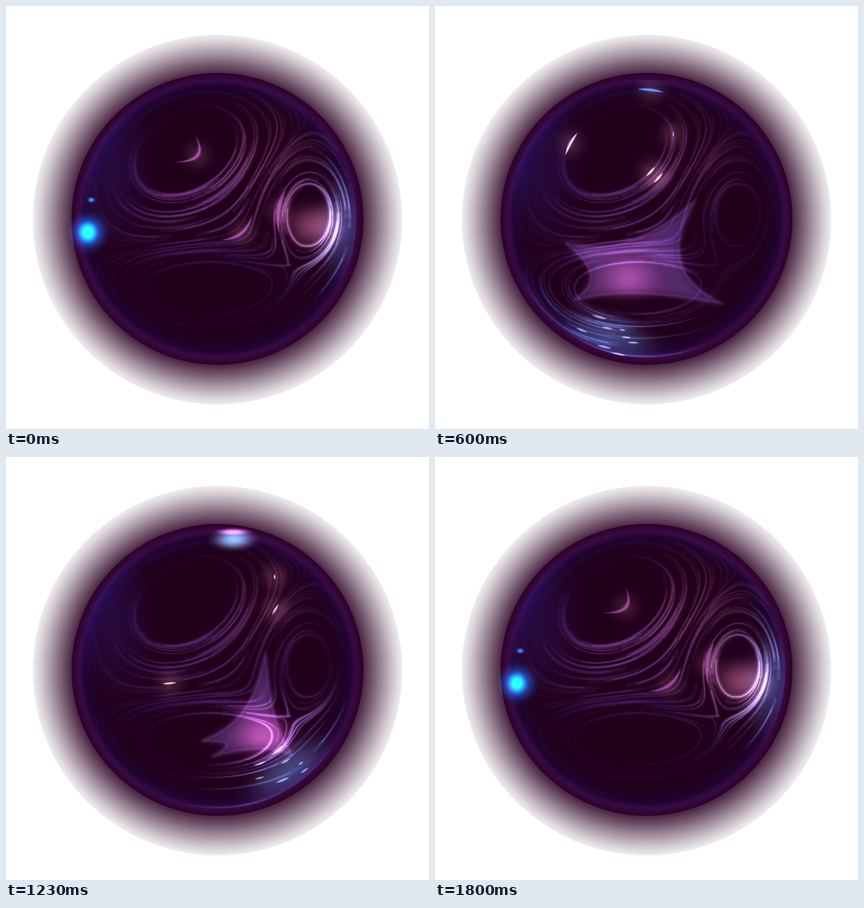
An HTML page with a canvas for the animation above (1830 ms loop, 600 by 600 pixels).

```html
<!DOCTYPE html>
<html lang="en">
<head>
<meta charset="utf-8">
<title>Glass orb</title>
<style>
  html, body { margin: 0; width: 100%; height: 100%; overflow: hidden; background: #fff; }
  canvas { display: block; width: 100vw; height: 100vh; }
</style>
</head>
<body>
<canvas id="stage" width="600" height="600"></canvas>
<script>
const LOOP = 1830, STEP = 30, TAU = Math.PI * 2;
const CX = 300, CY = 302, R = 197;
const ctx = document.getElementById('stage').getContext('2d');

const layer = () => {
  const c = document.createElement('canvas');
  c.width = c.height = 600;
  return c.getContext('2d');
};
const mix = (a, b, u) => a + (b - a) * u;
const clamp = u => Math.min(1, Math.max(0, u));
const smooth = u => (u = clamp(u)) * u * (3 - 2 * u);

let seed = 11;
const random = () => (seed = (seed * 16807) % 2147483647) / 2147483647;

// Signed distance in time around the loop
const since = (t, at) => ((t - at + LOOP * 1.5) % LOOP) - LOOP / 2;
const bell = (t, at, life) => Math.max(0, 1 - (since(t, at) / life) ** 2) ** 2;

function rgba(hex, alpha) {
  const n = parseInt(hex.slice(1), 16);
  return `rgba(${n >> 16},${n >> 8 & 255},${n & 255},${alpha})`;
}

// Three swirls inside the glass; the threads follow the level lines of their sum
const swirl = (x, y, cx, cy, rx, ry) => Math.exp(-(((x - cx) / rx) ** 2) - ((y - cy) / ry) ** 2);
function stream(x, y) {
  const edge = 1 - ((x - CX) ** 2 + (y - CY) ** 2) / (R * R);
  const lens = swirl(x + (y - 165) * .35, y, 245, 165, 120, 110);
  return edge * (lens - swirl(x, y, 455, 295, 65, 85) - swirl(x, y, 280, 408, 125, 45));
}

function follow(x, y, distance) {
  const steps = Math.max(1, Math.ceil(Math.abs(distance) / 3)), h = distance / steps;
  const points = [[x, y]];
  for (let i = 0; i < steps; i++) {
    const dx = stream(x + 1, y) - stream(x - 1, y), dy = stream(x, y + 1) - stream(x, y - 1);
    const size = Math.hypot(dx, dy) || 1;
    x -= dy / size * h;
    y += dx / size * h;
    points.push([x, y]);
  }
  return points;
}
const along = (x, y, distance) => follow(x, y, distance).pop();

function makeThreads(count) {
  const g = layer();
  g.lineJoin = 'round';
  while (count > 0) {
    const a = random() * TAU, r = R * Math.sqrt(random());
    const x = CX + r * Math.cos(a), y = CY + r * Math.sin(a);
    if (Math.abs(stream(x, y)) > .36) continue;
    const reach = 40 + random() * 75;
    const path = [...follow(x, y, -reach).reverse(), ...follow(x, y, reach)];
    const strength = .15 + random() * .55, width = .5 + random() * 1.4;
    for (const [spread, part] of [[4, .22], [2.2, .3], [1, 1]]) {
      // Shorter strokes on top make the ends fade
      const cut = Math.round(path.length * .06 * (4 - spread));
      g.beginPath();
      path.slice(cut, path.length - cut).forEach(p => g.lineTo(...p));
      g.strokeStyle = `rgba(255,255,255,${strength * part})`;
      g.lineWidth = width * spread;
      g.stroke();
    }
    count--;
  }
  return g.canvas;
}
const threads = makeThreads(125);
const lights = layer();

// Soft elliptical light
function blob(g, x, y, rx, ry, color, alpha = 1, angle = 0) {
  if (alpha <= 0) return;
  g.save();
  g.translate(x, y);
  g.rotate(angle);
  g.scale(rx, ry);
  const fill = g.createRadialGradient(0, 0, 0, 0, 0, 1);
  for (let u = 0; u <= 1; u += .2) fill.addColorStop(u, rgba(color, alpha * (1 - smooth(u))));
  g.fillStyle = fill;
  g.fillRect(-1, -1, 2, 2);
  g.restore();
}

// Tapered reflection that lies along the threads
function glint(x, y, length, color, alpha) {
  const [x0, y0] = along(x, y, -length / 2), [x1, y1] = along(x, y, length / 2);
  const mx = 2 * x - (x0 + x1) / 2, my = 2 * y - (y0 + y1) / 2;
  const span = Math.hypot(x1 - x0, y1 - y0) || 1;
  const nx = (y0 - y1) / span, ny = (x1 - x0) / span;
  const width = Math.min(4, 1.2 + length / 22);
  for (const [spread, part] of [[2.2, .18], [1.4, .3], [.7, .55]]) {
    const w = width * spread;
    ctx.fillStyle = rgba(color, alpha * part);
    ctx.beginPath();
    ctx.moveTo(x0, y0);
    ctx.quadraticCurveTo(mx + nx * w, my + ny * w, x1, y1);
    ctx.quadraticCurveTo(mx - nx * w, my - ny * w, x0, y0);
    ctx.fill();
  }
}

// Brief reflections: x, y, length
const FLASHES = [
  { at: 90, life: 420, color: '#84489a', spots: [[275, 207, 74], [338, 318, 62], [388, 285, 62]] },
  { at: 240, life: 210, color: '#9c6080', spots: [[190, 360, 44]] },
  { at: 600, life: 150, color: '#ffe8f0', spots: [[192, 195, 36], [306, 235, 18], [317, 244, 20]] },
  { at: 600, life: 150, color: '#20a0ff', spots: [[306, 119, 38], [338, 182, 8]] },
  { at: 960, life: 170, color: '#fff0ff',
    spots: [[240, 342, 110], [262, 418, 100], [279, 377, 9], [333, 402, 44], [396, 225, 36]] },
  { at: 960, life: 170, color: '#30a0ff', spots: [[327, 192, 26]] },
  { at: 1230, life: 140, color: '#ffe0d8', spots: [[381, 170, 8], [232, 321, 20], [382, 216, 18]] },
  { at: 1470, life: 150, color: '#ffe8f0', spots: [[236, 168, 17], [220, 163, 18]] },
  { at: 1470, life: 150, color: '#3858f0', spots: [[150, 257, 24], [223, 193, 6]] }
];

function drawFlashes(t) {
  for (const { at, life, color, spots } of FLASHES) {
    const power = bell(t, at, life);
    if (!power) continue;
    for (const [x, y, length] of spots) {
      const [px, py] = along(x, y, since(t, at) * .06);
      blob(ctx, px, py, 30, 30, '#503c38', power * .45);
      glint(px, py, length, color, power * .9);
    }
  }
}

// One pair of lights circles the lower right: a pink one inside, a blue one at the rim
function orbit(t) {
  const p = ((t - 420 + LOOP) % LOOP) / LOOP;
  const angle = (122 - 153 * p) * Math.PI / 180;
  const at = r => [CX + r * Math.cos(angle), CY + r * Math.sin(angle)];
  return { p, angle, power: smooth(Math.min(p, 1 - p) / .14), inner: at(80 + 78 * p), outer: at(174) };
}

function lamp(x, y, rx, ry, color, power, angle = 0) {
  blob(ctx, x, y, rx, ry, color, power * .6, angle);
  blob(lights, x, y, rx * 2.3, ry * 2.3, color, power, angle);
}

function drawLights(t) {
  const { p, angle, power, inner, outer } = orbit(t);
  const sweep = bell(t, 960, 230);
  lights.globalCompositeOperation = 'source-over';
  lights.clearRect(0, 0, 600, 600);
  lights.globalCompositeOperation = 'lighter';
  const mid = .62 + .2 * Math.cos(since(t, 60) / LOOP * TAU);
  blob(lights, 265, 275, 160, 110, '#704468', mid);
  blob(lights, 365, 210, 120, 110, '#6c4038', mid);
  blob(lights, CX, CY, 250, 250, '#141c50', .8);
  blob(ctx, 150, 230, 75, 140, '#0c1040', .5);

  const pink = `#${Math.round(mix(140, 196, p)).toString(16)}${p < .5 ? '5094' : '7488'}`;
  lamp(...inner, 56, 42, pink, power * .95);
  lamp(...outer, 42, 90, '#5088c0', power * mix(1, .6, p), angle);

  lamp(155, 382, 48, 36, '#c070b8', sweep);
  lamp(462, 290, 36, 62, '#50a4dc', sweep);
  lamp(420, 430, 60, 85, '#4880a8', sweep * .7, Math.PI / 4);

  lights.globalCompositeOperation = 'destination-in';
  lights.drawImage(threads, 0, 0);
  ctx.drawImage(lights.canvas, 0, 0);
}

// Soft veil stretched from the inner light to fixed points in the glass
function drawVeil(t) {
  const power = bell(t, 600, 250) + bell(t, 1230, 230);
  if (!power) return;
  const [x, y] = orbit(t).inner, u = clamp((t - 600) / 630);
  const tips = [[x - 90, mix(y - 50, y + 8, u)], [368, 277], [406, 422], [x - 75, y + 30]];
  ctx.save();
  ctx.filter = 'blur(5px)';
  ctx.beginPath();
  ctx.moveTo(...tips[0]);
  tips.forEach(([ax, ay], i) => {
    const [bx, by] = tips[(i + 1) % tips.length];
    ctx.quadraticCurveTo(mix((ax + bx) / 2, x, .7), mix((ay + by) / 2, y, .7), bx, by);
  });
  const fill = ctx.createRadialGradient(x, y, 0, x, y, 120);
  fill.addColorStop(0, rgba('#704478', power * .6));
  fill.addColorStop(1, rgba('#5050a0', power * .5));
  ctx.fillStyle = fill;
  ctx.fill();
  ctx.filter = 'blur(1.5px)';
  ctx.strokeStyle = rgba('#805898', power * .4);
  ctx.lineWidth = 2;
  ctx.stroke();
  ctx.restore();
}

// Small sparks scattered around the rim light
const sparks = Array.from({ length: 9 }, () => [(random() - .5) * 90, (random() - .5) * 55, 8 + random() * 18]);
function drawSparks(t) {
  const { p, power, outer: [x, y] } = orbit(t);
  for (const [dx, dy, length] of sparks) {
    glint(x + dx, y + dy, length, '#d8e8ff', power * .75 * smooth((.62 - p) / .25));
  }
}

function drawBase() {
  ctx.fillStyle = '#fff';
  ctx.fillRect(0, 0, 600, 600);
  const halo = ctx.createRadialGradient(CX, 303, R, CX, 303, 262);
  for (let u = 0; u <= 1.001; u += .1) {
    halo.addColorStop(Math.min(1, u), rgba('#2c0224', mix(1, .08, 1 - (1 - u) ** 1.25 * (1 + .25 * u))));
  }
  halo.addColorStop(1, rgba('#2c0224', 0));
  ctx.fillStyle = halo;
  ctx.fillRect(0, 0, 600, 600);

  const glass = ctx.createRadialGradient(CX, CY, 0, CX, CY, R + 10);
  [[0, '#21001a'], [.82, '#21001b'], [.91, '#1f042e'], [.95, '#380a45'], [1, '#2c0224']]
    .forEach(([at, c]) => glass.addColorStop(at, c));
  ctx.fillStyle = glass;
  ctx.beginPath();
  ctx.arc(CX, CY, R + 10, 0, TAU);
  ctx.fill();
}

function clipped(radius, draw) {
  ctx.save();
  ctx.beginPath();
  ctx.arc(CX, CY, radius, 0, TAU);
  ctx.clip();
  ctx.globalCompositeOperation = 'lighter';
  draw();
  ctx.restore();
}

function render(time) {
  const t = Math.floor((time % LOOP) / STEP) * STEP;
  drawBase();
  clipped(R, () => {
    drawLights(t);
    drawVeil(t);
    drawSparks(t);
    drawFlashes(t);
  });
  clipped(R + 14, () => {
    const left = bell(t, 0, 160), top = bell(t, 1230, 160);
    blob(ctx, 117, 321, 32, 32, '#0080ff', left);
    blob(ctx, 116, 321, 16, 18, '#10f0ff', left);
    blob(ctx, 121, 275, 7, 5, '#10a0ff', left);
    blob(ctx, 323, 117, 38, 18, '#80c8e8', top);
    blob(ctx, 322, 106, 30, 6, '#d070b8', top);
  });
}

const start = performance.now();
function tick() {
  render(performance.now() - start);
  requestAnimationFrame(tick);
}
tick();
</script>
</body>
</html>
```
